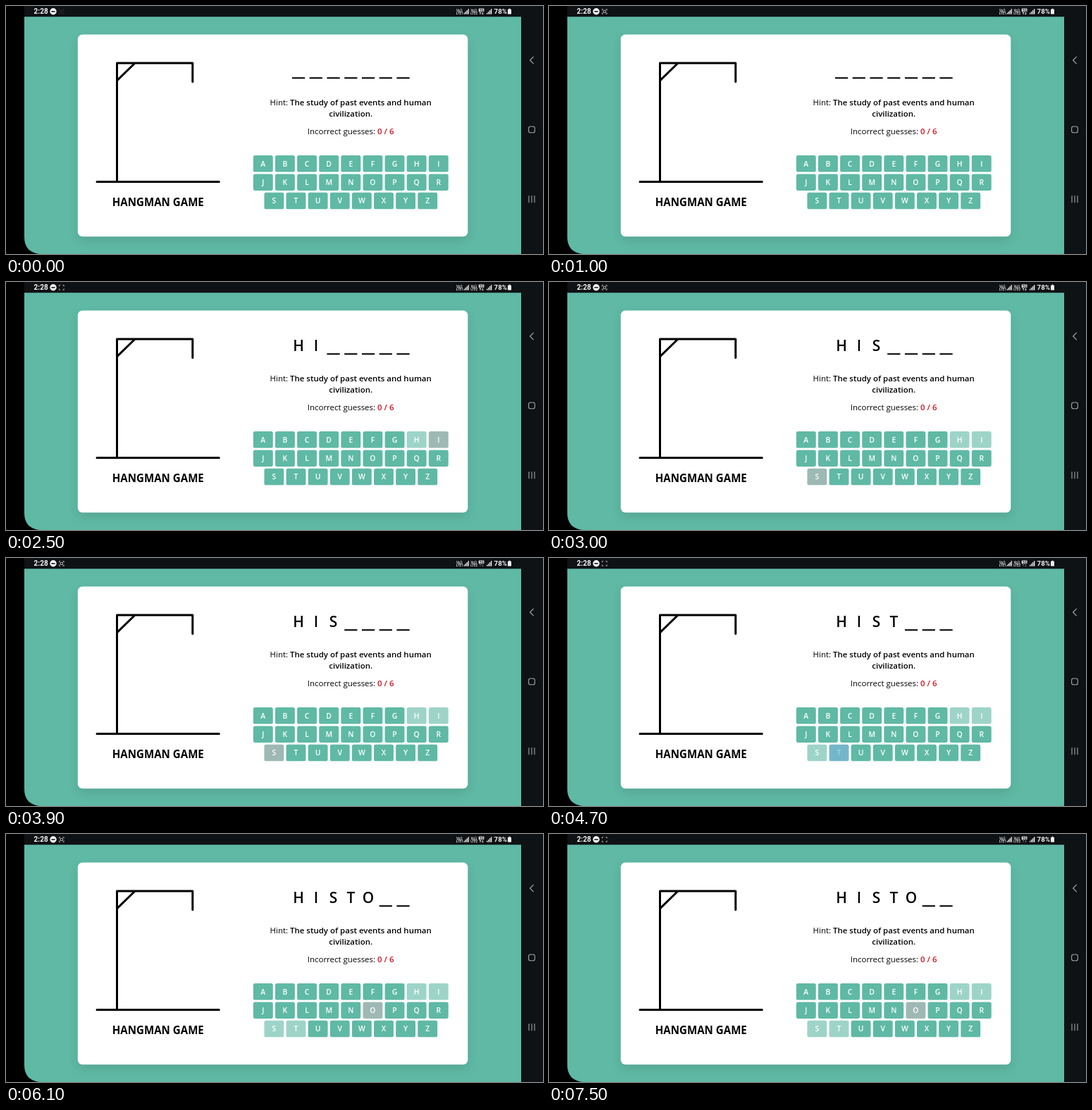
An HTML page for the animation above (8000 ms loop, 762 by 352 pixels).

```html
<!DOCTYPE html>
<html lang="en">
<head>
<meta charset="utf-8">
<title>Hangman Game</title>
<style>
  html, body { margin: 0; width: 100%; height: 100%; overflow: hidden; background: #000; }
  svg { display: block; width: 762px; height: 352px; font-family: "Open Sans", sans-serif; }
  .card { fill: #fff; filter: drop-shadow(0 6.5px 6.5px rgba(0, 0, 0, .1)); }
  .mid { text-anchor: middle; }
  .ink { fill: none; stroke: #000; stroke-width: 3; stroke-linecap: round; stroke-linejoin: round; }
  .copy { font-size: 11.46px; font-weight: 500; }
  .copy tspan { font-weight: 600; }
  .slot text { font-size: 20.84px; font-weight: 600; }
  .key rect { fill: #5fb9a5; }
  .key text { font-size: 10.42px; font-weight: 600; fill: #fff; }
  .key.used, .key.held { opacity: .6; }
  .key.held rect { fill: #5f8c82; }
  .key.tap rect { fill: #74b6c9; }
  .key.tap text { fill: #a5d1dd; }
  .status { fill: #f4f4f4; font-family: Roboto, sans-serif; font-weight: 700; }
  .tiny { font-size: 4.6px; font-weight: 500; }
  .nav { fill: none; stroke: #a4a6a8; stroke-width: 1.1; stroke-linecap: round; stroke-linejoin: round; }
</style>
</head>
<body>
<svg viewBox="0 0 762 352">
  <rect x="26" width="736" height="352" fill="#0f1215"/>
  <rect y="300" width="60" height="52"/>
  <path d="M26 15.3H731V352H47Q26 349 26 328Z" fill="#5fb9a5"/>
  <rect class="card" x="101.8" y="40.5" width="553.5" height="286.7" rx="6.5"/>

  <path class="ink" d="M129 249.4H302.3M157.5 249V81H264.8V107.6M158 105.3L182 82"/>
  <text class="mid" x="215.8" y="283.8" font-size="15.1" font-weight="700">HANGMAN GAME</text>

  <g id="word"></g>
  <g class="copy mid">
    <text x="489.2" y="141.3">Hint: <tspan>The study of past events and human</tspan></text>
    <text x="489.2" y="156.9"><tspan>civilization.</tspan></text>
    <text x="489.2" y="182.4">Incorrect guesses: <tspan fill="#cc1424">0 / 6</tspan></text>
  </g>
  <g id="keys"></g>

  <g class="status">
    <text x="39.6" y="11.2" font-size="10">2:28</text>
    <circle cx="67" cy="7.8" r="4.7"/>
    <path d="M64.4 7.8H69.6" stroke="#0f1215" stroke-width="1.5"/>
    <g id="capture" fill="none" stroke="#b9bbbd" stroke-width=".9">
      <path d="M75.4 6.4V4.6H77.2M80.4 4.6H82.2V6.4M82.2 9.4V11.2H80.4M77.2 11.2H75.4V9.4"/>
      <rect id="core" x="77.2" y="6.4" width="3.2" height="3"/>
    </g>
    <g class="tiny">
      <text x="639" y="7.6">Vo))</text><text x="638.8" y="11.9">LTE1</text>
      <text x="659.4" y="7.6">Vo))</text><text x="659.2" y="11.9">LTE2</text>
    </g>
    <g id="bars"></g>
    <rect x="670.8" y="3.4" width="7.6" height="4.8" rx=".8"/>
    <text x="672" y="7.5" font-size="4.6" fill="#0f1215">5G</text>
    <path id="data" d="M673 12V8.8M671.8 10L673 8.8L674.2 10M676.4 8.8V12M675.2 10.8L676.4 12L677.6 10.8" fill="none" stroke="#f4f4f4" stroke-width=".8"/>
    <text x="692.6" y="11.2" font-size="9.7">78%</text>
    <path d="M713.4 3.8H715.6V4.8H717V11.4H712V4.8H713.4Z"/>
  </g>
  <g class="nav">
    <path d="M748.4 72.2L743.6 77L748.4 81.8"/>
    <rect x="741.6" y="171" width="8.8" height="8.8" rx="2.6"/>
    <path d="M742 269.6V278.8M746 269.6V278.8M750 269.6V278.8"/>
  </g>
</svg>
<script>
const LOOP = 8000;
const presses = [["H", 1200], ["I", 1700], ["S", 2900], ["T", 4700], ["O", 6000]];
const blinks = [400, 1000, 1500, 1900, 2500, 2900, 3500, 3900, 4500, 4900, 5500, 5900, 6400, 7000, 7500];
const dataFlips = [3900, 6100, 7000];
const S = 0.6512, MID = 489.3;

const $ = id => document.getElementById(id);

function add(parent, tag, attrs, text = "") {
  const el = document.createElementNS("http://www.w3.org/2000/svg", tag);
  for (const k in attrs) el.setAttribute(k, attrs[k]);
  el.textContent = text;
  return parent.appendChild(el);
}

// Word slots
const slots = [];
for (let i = 0; i < 7; i++) {
  const x = MID + (i - 3) * 38 * S;
  const g = add($("word"), "g", { class: "slot mid" });
  slots.push({
    line: add(g, "rect", { x: x - 14 * S, y: 101.2, width: 28 * S, height: 2 }),
    text: add(g, "text", { x, y: 98.3 }, presses[i] ? presses[i][0] : "")
  });
}

// Keyboard
const keys = {};
["ABCDEFGHI", "JKLMNOPQR", "STUVWXYZ"].forEach((row, r) => {
  const w = 27.9, pitch = 31.12, y = 212.1 + r * 26.35;
  [...row].forEach((ch, c) => {
    const x = MID + (c - (row.length - 1) / 2) * pitch;
    const g = keys[ch] = add($("keys"), "g", {});
    add(g, "rect", { x: x - w / 2, y, width: w, height: 23.5, rx: 2.6 });
    add(g, "text", { class: "mid", x, y: y + 15.5 }, ch);
  });
});

// Signal strength
for (const x of [649.6, 670.2 - 0.6 - 20 + 20, 682].filter(v => v !== 669.6))
  for (let i = 0; i < 4; i++)
    add($("bars"), "rect", { x: x + i * 2, y: 9.8 - i * 1.9, width: 1.3, height: 1.8 + i * 1.9 });

const passed = (times, t) => times.filter(v => t >= v).length;

function draw(t) {
  const count = passed(presses.map(p => p[1]), t);
  slots.forEach((s, i) => {
    s.line.style.display = i < count ? "none" : "";
    s.text.style.display = i < count ? "" : "none";
  });
  for (const ch in keys) {
    const i = presses.findIndex(p => p[0] === ch);
    let state = "";
    if (i >= 0 && i < count)
      state = i < count - 1 ? "used" : t - presses[i][1] < 100 ? "tap" : "held";
    keys[ch].setAttribute("class", "key " + state);
  }
  $("core").style.display = passed(blinks, t) % 2 ? "none" : "";
  $("capture").style.opacity = t < 100 ? 0.15 : 1;
  $("data").style.opacity = passed(dataFlips, t) % 2 ? 0.35 : 1;
}

const start = performance.now();
function tick() {
  draw((performance.now() - start) % LOOP);
  requestAnimationFrame(tick);
}
draw(0);
requestAnimationFrame(tick);
</script>
</body>
</html>
```
